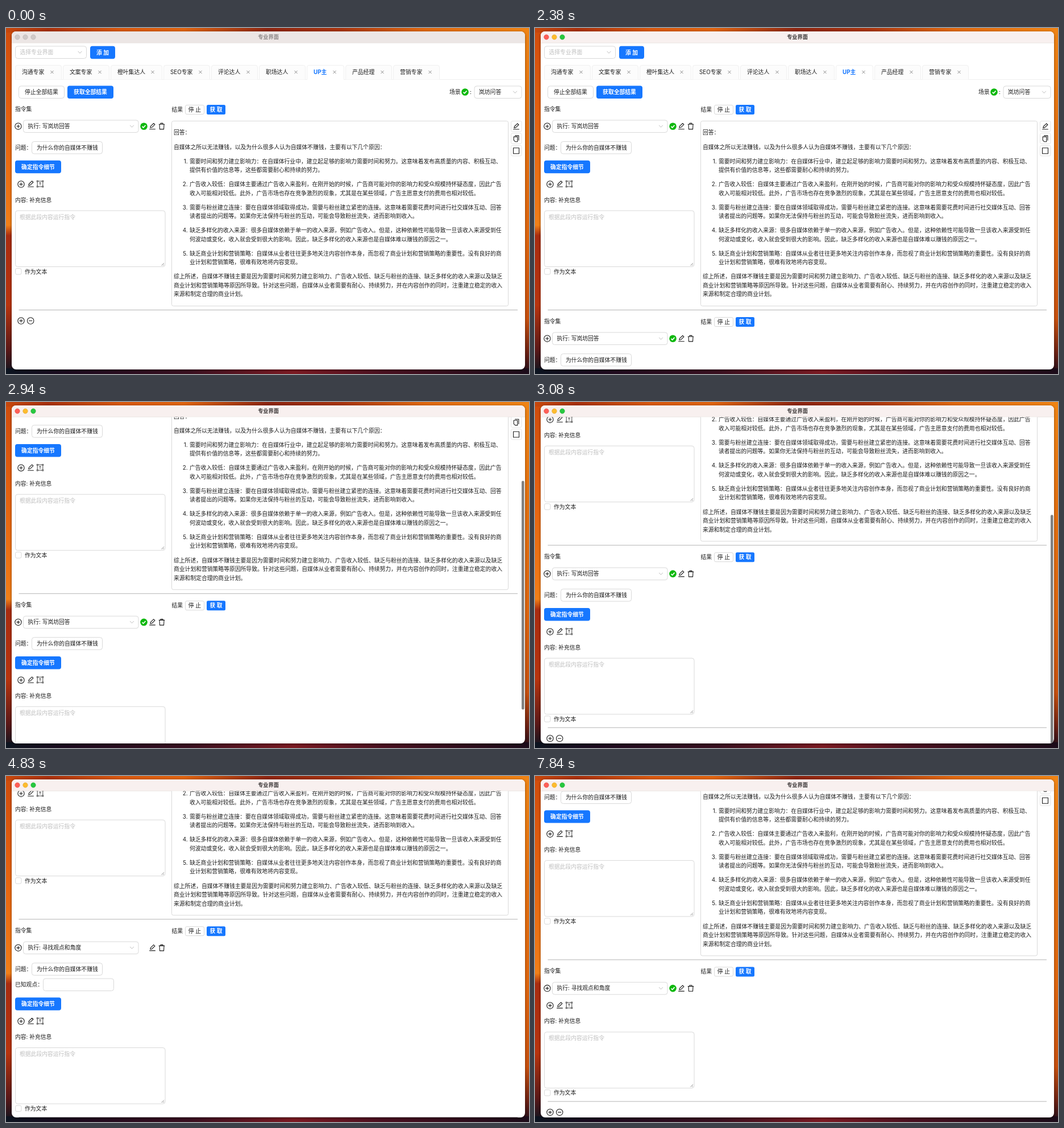
Animation of 920 by 608 pixels, one loop 8 s. Source, as an HTML page:

```html
<!DOCTYPE html>
<html lang="zh-CN">
<head>
<meta charset="utf-8">
<style>
html, body { margin: 0; width: 100%; height: 100%; overflow: hidden; }
body {
  background:
    linear-gradient(90deg, #c8480c, #a8300c 8%, #d8580e 22%, #e0640f 34%, #8c2410 50%, #a8340e 64%, #e0680f 80%, #f08414) 0 0 / 100% 8px no-repeat,
    linear-gradient(90deg, #0c1420, #1c0a1e 12%, #3a1020 35%, #7c1a22 55%, #4a1020 72%, #1c0c1a) 0 100% / 100% 10px no-repeat,
    linear-gradient(#d04c0c, #e4600f 25%, #f07816 52%, #f08018 57%, #a82c10 60%, #b8340e 80%, #5a1818 93%, #0c1420) 0 0 / 12px 100% no-repeat,
    linear-gradient(#f08414, #e4700f 30%, #e0660e 60%, #c8500e 84%, #6a2014 94%, #1c0c1a) 100% 0 / 12px 100% no-repeat,
    #a8380e;
}
svg { display: block; font: 9.8px Inter, "Noto Sans CJK SC", "Noto Sans CJK", sans-serif; fill: #1c1c1c; }
.line { fill: none; stroke: #1c1c1c; stroke-linejoin: round; stroke-width: 1.1; }
.win { filter: drop-shadow(0 1px 2px rgba(0, 0, 0, .45)); }
</style>
</head>
<body>
<svg id="stage" width="920" height="608" viewBox="0 0 920 608"></svg>
<script>
const BLUE = '#1677ff', GREY = '#bfbfbf', EDGE = '#d9d9d9';

const text = (x, y, s, extra = '') => `<text x="${x}" y="${y + 3.6}" ${extra}>${s}</text>`;
const box = (x, y, w, h, extra = '', r = 4) =>
  `<rect x="${x}" y="${y}" width="${w}" height="${h}" rx="${r}" fill="#fff" stroke="${EDGE}" ${extra}/>`;
const group = (id, body) => `<g id="${id}">${body}</g>`;
const path = (x, y, d, extra = '') =>
  `<path class="line" transform="translate(${x} ${y})" d="${d}" ${extra}/>`;
const rule = y => `<path d="M22.5 ${y}H900" stroke="#b4b4b4"/>`;

// Icons, each centred on x, y
const ring = 'M-5.7 0A5.7 5.7 0 1 1 5.7 0A5.7 5.7 0 1 1 -5.7 0M-3 0H3';
const plus = (x, y) => path(x, y, ring + 'M0 -3V3');
const minus = (x, y) => path(x, y, ring);
const pen = (x, y) => path(x, y, 'M-3.7 2.6L-3.1 0L2.2 -5.2L4.4 -3L-1 2.1ZM-5.3 5H5.3');
const bin = (x, y) => path(x, y, 'M-5.2 -3.5H5.2M-2 -3.5V-5.3H2V-3.5M-4 -3.5L-3.5 5.2H3.5L4 -3.5');
const copy = (x, y) => path(x, y, 'M-4.3 -3.3H2.2V5.3H-1.8L-4.3 2.8ZM-2.4 -5.3H4.4V3.4');
const square = (x, y) => path(x, y, 'M-5 -5H5V5H-5Z');
const frameT = (x, y) => path(x, y, 'M-4.8 -4.8H4.8V4.8H-4.8ZM-2 -2H2M0 -2V2.4', 'style="stroke-width:.8"') +
  [-4.8, 4.8].map(a => [-4.8, 4.8].map(b =>
    `<rect x="${x + a - 1}" y="${y + b - 1}" width="2" height="2" fill="#fff" stroke="#1c1c1c" stroke-width=".7"/>`).join('')).join('');
const tick = (x, y) => `<circle cx="${x}" cy="${y}" r="6.3" fill="#0fb80f"/>` +
  path(x, y, 'M-3 .2L-.9 2.4L3 -2', 'style="stroke:#fff;stroke-width:1.6"');
const chevron = (x, y) => path(x, y, 'M-3.3 -1.7L0 1.9L3.3 -1.7', `style="stroke:${GREY};stroke-width:1"`);
const cross = (x, y) => path(x, y, 'M-2.6 -2.6L2.6 2.6M2.6 -2.6L-2.6 2.6', 'style="stroke:#808080;stroke-width:.9"');

const button = (x, y, w, h, label, id = '') =>
  `<rect ${id && `id="${id}"`} x="${x}" y="${y}" width="${w}" height="${h}" rx="${h < 20 ? 2.5 : 4}" fill="${BLUE}"/>` +
  text(x + w / 2, y + h / 2, label, 'text-anchor="middle" fill="#fff" font-weight="700"');
const plain = (x, y, w, h, label) => box(x, y, w, h, '', h < 20 ? 2.5 : 4) +
  text(x + w / 2, y + h / 2, label, 'text-anchor="middle"');
const select = (x, y, w, label, extra) => box(x, y, w, 21.5) + text(x + 8, y + 10.5, label, extra) + chevron(x + w - 11.5, y + 10.5);

// One block of instructions; k prefixes the ids of its moving parts
const section = k =>
  text(16, 142.5, '指令集') + text(291.5, 143, '结果') +
  plain(315.5, 135.5, 33, 16, '停 止') + button(353, 135, 33, 17, '获 取', k + 'Get') +
  plus(21.5, 172.7) + select(30.5, 162, 202.5, `执行: <tspan id="${k}Task">写岚坊回答</tspan>`) +
  group(k + 'Tick', tick(242.5, 172.7)) + pen(257.5, 172.7) + bin(274, 172.7) +
  group(k + 'Ask', text(16, 210, '问题：') + box(45.5, 199.5, 124, 21.5) + text(54, 210, '为什么你的自媒体不赚钱')) +
  group(k + 'View', text(16, 237.5, '已知观点：') + box(65.5, 226.8, 124, 21.5, `id="${k}Input"`)) +
  group(k + 'Ok', button(16, 232.8, 81, 22.4, '确定指令细节', k + 'OkBtn')) +
  group(k + 'Rest',
    plus(26.5, 274.5) + pen(43.5, 274) + frameT(60, 274) + text(16, 302, '内容: 补充信息') +
    box(16.5, 321, 263.5, 98.5) + text(24, 332, '根据此段内容运行指令', `fill="${GREY}"`) +
    path(278, 417.5, 'M-4.5 0L0 -4.5M-1.8 0L0 -1.8', 'style="stroke:#777;stroke-width:.8"') +
    box(16.5, 422.5, 10.5, 10.5, '', 2.5) + text(33, 428, '作为文本'));

const tabNames = ['沟通专家', '文案专家', '橙叶集达人', 'SEO专家', '评论达人', '职场达人', 'UP主', '产品经理', '营销专家'];
const tabX = [16, 100, 184, 277, 361, 445, 529, 597, 681, 765];
const tabs = `<path d="M16 90.5H907" stroke="#f0f0f0"/>` + tabNames.map((name, i) => {
  const x = tabX[i] + .5, end = tabX[i + 1] - 2.5, on = name === 'UP主';
  return `<path d="M${x} 90.5V69q0 -3.5 3.5 -3.5H${end - 3.5}q3.5 0 3.5 3.5V90.5" fill="${on ? '#fff' : '#fcfcfc'}" stroke="#f0f0f0"/>` +
    (on ? `<path d="M${x + .5} 90.5H${end - .5}" stroke="#fff"/>` : '') +
    text(tabX[i] + 12, 77.5, name, on ? `fill="${BLUE}" font-weight="700"` : '') + cross(end - 16.5, 77.5);
}).join('');

const points = [
  ['需要时间和努力建立影响力：在自媒体行业中，建立起足够的影响力需要时间和努力。这意味着发布高质量的内容、积极互动、', '提供有价值的信息等，这些都需要耐心和持续的努力。'],
  ['广告收入较低：自媒体主要通过广告收入来盈利，在刚开始的时候，广告商可能对你的影响力和受众规模持怀疑态度，因此广告', '收入可能相对较低。此外，广告市场也存在竞争激烈的现象，尤其是在某些领域，广告主愿意支付的费用也相对较低。'],
  ['需要与粉丝建立连接：要在自媒体领域取得成功，需要与粉丝建立紧密的连接。这意味着需要花费时间进行社交媒体互动、回答', '读者提出的问题等。如果你无法保持与粉丝的互动，可能会导致粉丝流失，进而影响到收入。'],
  ['缺乏多样化的收入来源：很多自媒体依赖于单一的收入来源，例如广告收入。但是，这种依赖性可能导致一旦该收入来源受到任', '何波动或变化，收入就会受到很大的影响。因此，缺乏多样化的收入来源也是自媒体难以赚钱的原因之一。'],
  ['缺乏商业计划和营销策略：自媒体从业者往往更多地关注内容创作本身，而忽视了商业计划和营销策略的重要性。没有良好的商', '业计划和营销策略，很难有效地将内容变现。']
];
const ending = [
  '综上所述，自媒体不赚钱主要是因为需要时间和努力建立影响力、广告收入较低、缺乏与粉丝的连接、缺乏多样化的收入来源以及缺乏',
  '商业计划和营销策略等原因所导致。针对这些问题，自媒体从业者需要有耐心、持续努力，并在内容创作的同时，注重建立稳定的收入',
  '来源和制定合理的商业计划。'
];
const answer = box(291.5, 163.5, 592, 325, '', 3) + text(295, 183.7, '回答：') +
  text(295, 209, '自媒体之所以无法赚钱，以及为什么很多人认为自媒体不赚钱，主要有以下几个原因：') +
  points.map((p, i) => text(319.5, 234 + i * 40.5, i + 1 + '.', 'text-anchor="end"') +
    p.map((s, j) => text(323, 234 + i * 40.5 + j * 15.5, s)).join('')).join('') +
  ending.map((s, i) => text(295, 436.8 + i * 15.5, s)).join('') +
  [pen, copy, square].map((icon, i) =>
    box(888.5, 163.5 + i * 21.4, 18.5, 18.5, 'style="stroke:#e4e4e4"', 2.5) + icon(897.5, 173 + i * 21.4)).join('');

const head = select(16.5, 32, 125, '选择专业界面', `fill="${GREY}"`) + button(148, 31.8, 44, 22.4, '添 加') + tabs +
  plain(22.5, 102, 80, 21.5, '停止全部结果') + button(108, 101.5, 81, 22.4, '获取全部结果') +
  text(780, 112.5, '场景') + tick(807.5, 112.5) + text(816, 112.5, ':') + select(824, 102, 83, '岚坊问答');

stage.innerHTML =
  `<clipPath id="clip"><path d="M10 26.5H913V592q0 8 -8 8H18q-8 0 -8 -8Z"/></clipPath>
  <rect class="win" x="10" y="6" width="903" height="594" rx="8" fill="#fff"/>
  <path id="bar" d="M10 26V14q0 -8 8 -8H905q8 0 8 8V26Z"/><path d="M10 26.3H913" stroke="#e2dcda" stroke-width=".7"/>` +
  [20, 34, 48].map(x => `<circle class="lamp" cx="${x}" cy="16" r="4.2" stroke-width=".6"/>`).join('') +
  text(461.5, 15.8, '专业界面', 'id="title" text-anchor="middle" font-size="9.2" font-weight="700"') +
  `<g clip-path="url(#clip)">` +
  group('page', head + section('a') + answer + rule(495.5) +
    group('second', `<g transform="translate(0 373)">${section('b')}</g>`) +
    group('foot', group('footRule', rule(-19)) + plus(26.5, 0) + minus(43.2, 0))) +
  `<rect id="thumb" x="907" width="4.6" height="402" rx="2.3" fill="#808080"/></g>`;

const $ = id => document.getElementById(id);
const show = (id, on) => $(id).setAttribute('display', on ? 'inline' : 'none');
const shift = (id, y) => $(id).setAttribute('transform', `translate(0 ${y})`);
const ramp = (t, a, b) => Math.min(1, Math.max(0, (t - a) / (b - a)));
const mix = (a, b, p) => `rgb(${a.map((v, i) => Math.round(v + (b[i] - v) * p))})`;
const base = [22, 119, 255], light = [64, 150, 255], edge = [217, 217, 217];
const lamps = [...document.querySelectorAll('.lamp')];

show('aView', false);

function draw(t) {
  t = Math.floor(t / 70) * 70;
  const active = t >= 490, added = t >= 2380, changed = t >= 4830, done = t >= 6090;

  $('bar').setAttribute('fill', active ? '#f8f0ef' : '#ece6e5');
  $('title').setAttribute('fill', active ? '#3a3636' : '#8c8686');
  lamps.forEach((lamp, i) => {
    lamp.setAttribute('fill', active ? ['#fe5f57', '#febc2e', '#28c840'][i] : '#d0cac9');
    lamp.setAttribute('stroke', active ? ['#e0443e', '#dea123', '#1aab29'][i] : '#bab4b3');
  });

  const p = ramp(t, 2728, 3080);
  const scroll = done ? 172.6 : 243.8 * p * p * (3 - 2 * p);
  shift('page', -scroll);
  $('thumb').setAttribute('y', 27 + scroll * .702);
  $('thumb').setAttribute('opacity', t < 2800 ? 0 : 1 - ramp(t, 3500, 3780));

  const rows = done ? -71.5 : changed ? 27.3 : 0;
  show('second', added);
  show('footRule', added);
  shift('foot', added ? 835 + rows : 514.5);
  shift('bRest', rows);
  shift('bOk', rows);
  $('bTask').textContent = changed ? '寻找观点和角度' : '写岚坊回答';
  show('bTick', !changed || done);
  show('bAsk', !done);
  show('bView', changed && !done);
  show('bOk', !done);

  // Pointer passes over the empty field, then rests on the buttons
  const field = ramp(t, 5110, 5250) - ramp(t, 5320, 5460);
  $('bInput').setAttribute('stroke', mix(edge, light, field));
  $('bOkBtn').setAttribute('fill', mix(base, light, ramp(t, 5320, 5530)));
  $('bGet').setAttribute('fill', mix(base, light, ramp(t, 7070, 7280) - ramp(t, 7350, 7560)));
}

function tickFrame() {
  draw(performance.now() % 8000);
  requestAnimationFrame(tickFrame);
}
tickFrame();
</script>
</body>
</html>
```
